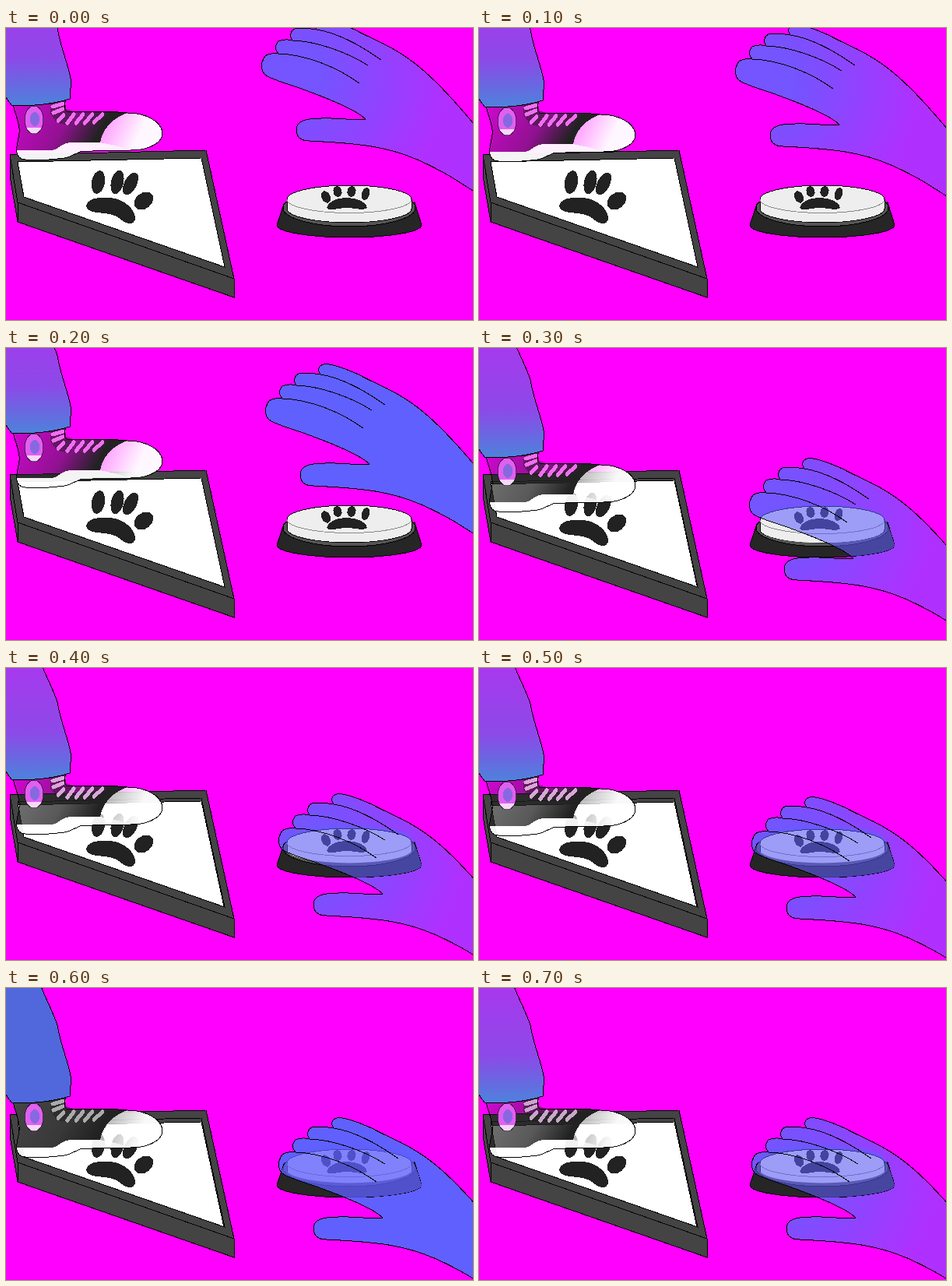
Write an HTML page without scripts that moves like this. It is 600x375 px and loops after 1000 ms.

```html
<!DOCTYPE html>
<html lang="en">
<head>
<meta charset="utf-8">
<title>Pedal and button</title>
<style>
html, body { margin: 0; height: 100%; overflow: hidden; background: #f0f; }
svg { display: block; width: 100%; height: 100%; }
.line { fill: none; stroke: #000; }
.foot, .plate, .cap, .hand, .unhand, .solid, .flash, .lace {
  animation: 1s step-end infinite;
}

.foot { animation-name: foot; }
@keyframes foot {
  0% { transform: none; }
  10% { transform: translateY(2px); }
  20% { transform: translateY(10px); }
  30% { transform: translateY(41px); }
  40% { transform: translateY(44px); }
  50% { transform: translateY(46px); }
  60%, 100% { transform: translateY(48px); }
}

.plate { animation-name: plate; }
@keyframes plate {
  0% { transform: none; }
  30% { transform: translateY(3px); }
  40% { transform: translateY(4px); }
  50%, 100% { transform: translateY(5px); }
}

.cap { animation-name: cap; }
@keyframes cap {
  0% { transform: none; }
  30% { transform: translateY(1px); }
  40% { transform: translateY(4px); }
  50%, 100% { transform: translateY(5px); }
}

.hand { animation-name: hand; }
@keyframes hand {
  0% { transform: none; }
  10% { transform: translate(1px, 7px); }
  20% { transform: translate(5px, 32px); }
  30% { transform: translate(19px, 153px); }
  40% { transform: translate(22px, 173px); }
  50% { transform: translate(22px, 177px); }
  60%, 100% { transform: translate(22px, 178px); }
}

/* cancels .hand, so the button stays put inside the hand's clip */
.unhand { animation-name: unhand; }
@keyframes unhand {
  0% { transform: none; }
  10% { transform: translate(-1px, -7px); }
  20% { transform: translate(-5px, -32px); }
  30% { transform: translate(-19px, -153px); }
  40% { transform: translate(-22px, -173px); }
  50% { transform: translate(-22px, -177px); }
  60%, 100% { transform: translate(-22px, -178px); }
}

.solid { animation-name: solid; }
@keyframes solid {
  0%, 30%, 70%, 100% { opacity: 0; }
  20%, 60% { opacity: 1; }
}

.flash { animation-name: flash; }
@keyframes flash { 0%, 70%, 100% { opacity: 0; } 60% { opacity: 1; } }

.lace { animation-name: lace; }
@keyframes lace {
  0% { stroke: #f070f0; }
  40% { stroke: #d8a8d8; }
  60% { stroke: #aaa; }
  70%, 100% { stroke: #c8a8c8; }
}
</style>
</head>
<body>
<svg viewBox="0 0 600 375" preserveAspectRatio="none" shape-rendering="crispEdges">
  <defs>
    <linearGradient id="legFade" gradientUnits="userSpaceOnUse" x1="0" y1="-50" x2="0" y2="96">
      <stop offset="0" stop-color="#5070dc" stop-opacity=".5"/>
      <stop offset=".6" stop-color="#5070dc" stop-opacity=".65"/>
      <stop offset="1" stop-color="#5080dc"/>
    </linearGradient>
    <linearGradient id="bodyFade" gradientUnits="userSpaceOnUse" x1="20" y1="95" x2="112" y2="148">
      <stop offset="0" stop-color="#222" stop-opacity=".25"/>
      <stop offset=".6" stop-color="#222" stop-opacity=".5"/>
      <stop offset="1" stop-color="#222"/>
    </linearGradient>
    <linearGradient id="toeFade" gradientUnits="userSpaceOnUse" x1="128" y1="115" x2="172" y2="136">
      <stop offset="0" stop-color="#fff" stop-opacity=".6"/>
      <stop offset="1" stop-color="#fff" stop-opacity=".97"/>
    </linearGradient>
    <radialGradient id="handFade" gradientUnits="userSpaceOnUse" cx="365" cy="60" r="200">
      <stop offset=".2" stop-color="#6060ff" stop-opacity=".88"/>
      <stop offset="1" stop-color="#6060ff" stop-opacity=".5"/>
    </radialGradient>

    <path id="hole" d="M15 172L251 167L281 307L23 217Z"/>
    <path id="plateShape" d="M5 163L257 157L293 322V346L15 249L5 190Z"/>
    <path id="leg" d="M45 -50C52 -32 61 -16 66 0C70 25 81 50 83 65C84 75 82 86 82 91C60 98 30 101 7 99L-5 82V-50Z"/>
    <path id="body" d="M9 97C11 112 19 122 17 135C16 145 13 150 14 157L60 157C68 155 72 148 82 147L121 147C124 130 136 116 156 109C130 106 100 108 78 107C72 103 77 99 76 92Z"/>
    <path id="toe" d="M121 147C124 130 136 116 156 109C178 109 199 119 201 134C201 138 200 142 196 146C188 153 176 157 160 157C140 150 130 149 121 147Z"/>
    <path id="sole" d="M14 157L60 157C68 155 72 148 82 147L121 147C130 149 140 150 160 157C135 158 115 157 95 159C84 164 78 168 66 168C48 170 30 171 20 168Q13 164 14 157Z"/>
    <path id="shoeLine" d="M9 97C11 112 19 122 17 135C16 145 13 150 14 157Q13 164 20 168C30 171 48 170 66 168C78 168 84 164 95 159C115 157 135 158 160 157C176 157 188 153 196 146C200 142 201 138 201 134C199 119 178 109 156 109C130 106 100 108 78 107C72 103 77 99 76 92"/>
    <path id="handShape" d="M640 155L600 122C575 92 545 58 515 38C490 20 465 12 450 3C430 -6 412 -13 403 -11C396 -9 395 -4 399 2C388 0 376 0 371 1C365 4 364 11 368 16C362 14 352 15 349 18C345 23 346 29 350 33C340 32 333 34 331 39C327 47 328 54 332 59C338 66 365 72 385 80C415 91 450 105 462 117C445 119 425 115 405 116C388 116 373 119 373 130C373 141 380 145 390 145C425 147 450 148 475 153C515 160 545 176 570 190L600 209L640 232Z"/>
    <path id="buttonShape" d="M361 220A80 18 0 0 1 521 220Q527 228 534 253A93 16 0 0 1 348 253Q351 238 361 220Z"/>

    <clipPath id="inHole"><use href="#hole"/></clipPath>
    <clipPath id="inPlate"><use href="#plateShape"/></clipPath>
    <clipPath id="inHand"><use href="#handShape"/></clipPath>
    <clipPath id="inRim"><path d="M350 190H532V232H523A82 18.5 0 0 1 359 232H350Z"/></clipPath>
  </defs>

  <rect width="600" height="375" fill="#f0f"/>

  <!-- pedal -->
  <use href="#plateShape" fill="#444" stroke="#000"/>
  <path class="line" d="M5 163L15 224L293 322M15 224V249"/>
  <g clip-path="url(#inHole)">
    <g class="plate">
      <use href="#hole" fill="#fff" stroke="#000"/>
      <g fill="#222">
        <ellipse rx="8.5" ry="15" transform="translate(118.5 198) rotate(10)"/>
        <ellipse rx="8" ry="15.5" transform="translate(143 198) rotate(13)"/>
        <ellipse rx="8" ry="15.5" transform="translate(160 200) rotate(27)"/>
        <ellipse rx="13.5" ry="10" transform="translate(177 222) rotate(-38)"/>
        <path d="M103 228C105 218 121 217 134 218C151 219 166 233 166 244C166 253 155 253 149 247C140 238 128 238 116 237C108 236 103 233 103 228Z"/>
      </g>
    </g>
  </g>
  <use href="#hole" class="line"/>

  <!-- foot -->
  <g clip-path="url(#inPlate)">
    <use class="foot" href="#body" fill="#222" opacity=".5"/>
  </g>
  <g class="foot">
    <use class="flash" href="#body" fill="#505050"/>
    <use href="#body" fill="url(#bodyFade)"/>
    <use href="#sole" fill="#fff" opacity=".94"/>
    <use href="#toe" fill="url(#toeFade)"/>
    <path d="M57 96L76 93L77 104L90 108L82 125L66 122L57 110Z" fill="#222" opacity=".5"/>
    <path class="lace" fill="none" stroke-width="5" stroke-linecap="round" d="M60 101L74 97M61 109L73 104M67 119L74 112M79 122L87 111M90 122L99 111M101 122L111 111M113 121L124 111"/>
    <ellipse cx="36" cy="118" rx="12" ry="18" fill="#e060f0"/>
    <ellipse cx="37" cy="117" rx="6" ry="9" fill="#8868e0"/>
    <path d="M26 128H46Q43 136 36 136T26 128Z" fill="#fff" opacity=".75"/>
    <ellipse class="line" cx="36" cy="118" rx="12" ry="18" stroke-opacity=".6"/>
    <use href="#shoeLine" class="line"/>
    <use href="#leg" fill="url(#legFade)"/>
    <use class="flash" href="#leg" fill="#5068dc"/>
    <use href="#leg" class="line"/>
  </g>

  <!-- hand, with the button showing through -->
  <g class="hand">
    <use href="#handShape" fill="url(#handFade)"/>
    <use class="solid" href="#handShape" fill="#6060ff"/>
  </g>
  <path d="M357 226L348 253A93 16 0 0 0 534 253L525 224Z" fill="#262626" stroke="#000"/>
  <ellipse cx="441" cy="231" rx="85" ry="24" fill="#555" stroke="#000"/>
  <g clip-path="url(#inRim)">
    <g class="cap">
      <path d="M361 220V232A80 18 0 0 0 521 232V220A80 18 0 0 0 361 220Z" fill="#eee" stroke="#000"/>
      <path d="M361 220A80 17.5 0 0 0 521 220" fill="none" stroke="#888"/>
      <g fill="#222">
        <ellipse rx="5.5" ry="8" transform="translate(411 217) rotate(-25)"/>
        <ellipse rx="5.5" ry="7" transform="translate(426 210) rotate(-12)"/>
        <ellipse rx="5.5" ry="7" transform="translate(444 210) rotate(12)"/>
        <ellipse rx="5" ry="8.5" transform="translate(462 213) rotate(18)"/>
        <path d="M412 231C414 222 426 218 437 218C449 218 463 223 464 231C460 235 448 231 437 231C427 231 415 236 412 231Z"/>
      </g>
    </g>
  </g>
  <g class="hand">
    <g clip-path="url(#inHand)">
      <g class="unhand">
        <use href="#buttonShape" fill="#6060ff" opacity=".57"/>
        <g class="flash"><use href="#buttonShape" fill="#6060ff" opacity=".45"/></g>
      </g>
    </g>
    <use href="#handShape" class="line"/>
    <path class="line" d="M350 33C385 34 425 50 454 71M368 16C400 17 440 32 465 48M399 2C425 6 455 22 482 41"/>
  </g>
</svg>
</body>
</html>
```
